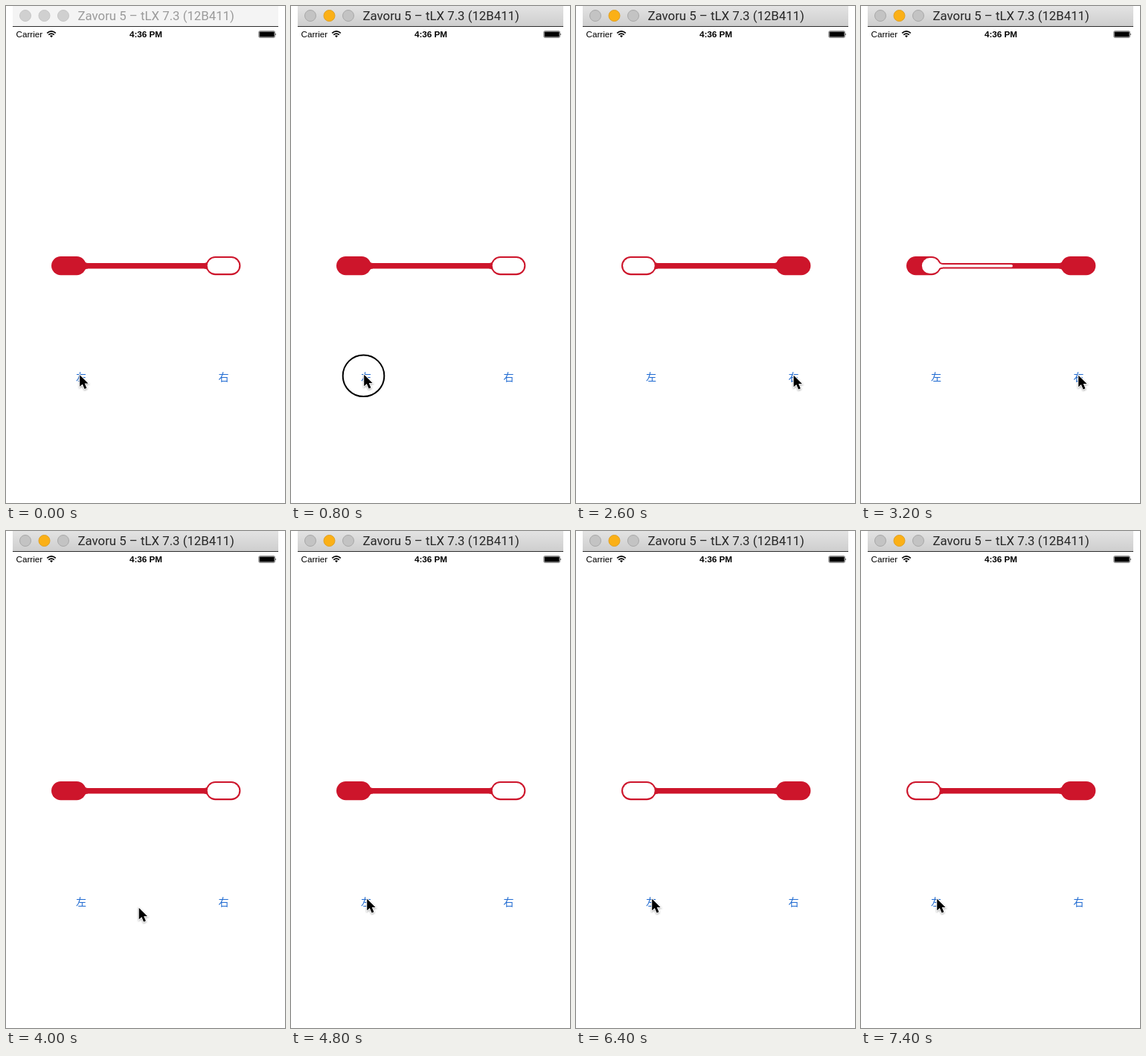
These frames come from a looping animation (375x667 px, 7600 ms). An HTML page:

```html
<!DOCTYPE html>
<html lang="en">
<head>
<meta charset="utf-8">
<title>Switch animation</title>
<style>
  html, body { margin: 0; height: 100%; overflow: hidden; background: #fff; }
  svg { display: block; width: 100vw; height: 100vh; }
  #title { font: 16.8px Roboto, sans-serif; }
  .status { font: 11.7px "Liberation Sans", Arial, sans-serif; }
  .bold { font-weight: bold; text-anchor: middle; }
  .button { font: 14px "Noto Sans CJK SC", "Noto Sans CJK JP", sans-serif; fill: #226cd2; text-anchor: middle; }
  #cursor { filter: drop-shadow(0 1.2px 1px rgba(0, 0, 0, .35)); }
</style>
</head>
<body>
<svg viewBox="0 0 375 667">
  <defs>
    <linearGradient id="chrome" x2="0" y2="1">
      <stop stop-color="#e3e3e3"/><stop offset="1" stop-color="#cecece"/>
    </linearGradient>
    <g id="redEnd">
      <rect x="61" y="336" width="46.6" height="25.2" rx="12.6"/>
      <path d="M103.5 341Q106.5 345 110 345V352.5Q106.5 352.5 103.5 356.5Z"/>
    </g>
  </defs>

  <rect id="bar" x="9" width="357" height="27"/>
  <rect x="9" y="27" width="357" height="1" fill="#2c2c2c"/>
  <g id="dots">
    <circle cx="26" cy="13" r="7.5"/>
    <circle id="amber" cx="51.5" cy="13" r="7.5"/>
    <circle cx="77" cy="13" r="7.5"/>
  </g>
  <text id="title" x="96.5" y="19.3">Zavoru 5 – tLX 7.3 (12B411)</text>

  <text class="status" x="13.5" y="42">Carrier</text>
  <g fill="none" stroke="#000" stroke-width="1.7">
    <path d="M55.2 36.3Q61 31.5 66.8 36.3M57.2 38.7Q61 35.5 64.8 38.7"/>
    <path d="M59 40Q61 38.4 63 40L61 42.2Z" fill="#000" stroke="none"/>
  </g>
  <text class="status bold" x="188" y="42">4:36 PM</text>
  <rect x="339.8" y="33.6" width="21.6" height="8.8" rx="1.6" fill="none" stroke="#000" stroke-width=".5"/>
  <rect x="340.6" y="34.4" width="20" height="7.2" rx=".8"/>
  <path d="M362.3 36.4Q364 38 362.3 39.6Z"/>

  <g fill="#cd152b">
    <use href="#redEnd"/>
    <use href="#redEnd" transform="translate(376.4) scale(-1 1)"/>
    <rect x="105" y="345" width="166" height="7.5"/>
  </g>
  <g id="flow" fill="#fff">
    <rect id="sourcePod"/>
    <path id="neck" d="M100 340.5Q105.5 346.9 110 346.9V350.6Q105.5 350.6 100 357Z"/>
    <rect id="stream" y="346.9" height="3.7" rx="1.85"/>
    <rect id="targetPod"/>
  </g>

  <text class="button" x="101" y="503">左</text>
  <text class="button" x="292.5" y="503">右</text>

  <circle id="ring" r="27.8" fill="none" stroke="#000" stroke-width="2"/>
  <path id="cursor" d="M.7 1.2V16.8L4.3 13.5L7.1 20L9.9 18.8L7.2 12.4H12Z" stroke="#fff" stroke-width="1.8" paint-order="stroke"/>
</svg>
<script>
const LOOP = 7600, STEP = 200, STAGE = 400;
const MIRROR = "translate(376.4) scale(-1 1)";
const POD = { left: 63.1, right: 105.7, top: 338.1, height: 21 };
const STREAM = { from: 107, length: 163 };

// Each move lasts two stages: the first pod drains, then the second fills.
const moves = [
  { start: 1000, left: true },
  { start: 3000, left: false },
  { start: 5150, left: true }
];
const presses = [[600, 1000], [2800, 3000]];
// time, x, y of the pointer tip
const pointerPath = [
  [0, 98.5, 494], [400, 97.5, 493.5], [1200, 97.5, 493.5], [1800, 250.5, 486],
  [2400, 292, 494.5], [3400, 291.5, 494.5], [4000, 178, 504.5],
  [4200, 148, 505], [4600, 101.5, 492.5]
];

const $ = id => document.getElementById(id);
const clamp = v => Math.min(1, Math.max(0, v));
const set = (id, attrs) => {
  for (const name in attrs) $(id).setAttribute(name, attrs[name]);
};

function pointerAt(t) {
  const i = pointerPath.findIndex(p => p[0] > t);
  if (i < 0) return pointerPath.at(-1).slice(1);
  const [a, b] = [pointerPath[i - 1], pointerPath[i]];
  const k = (t - a[0]) / (b[0] - a[0]);
  return [a[1] + (b[1] - a[1]) * k, a[2] + (b[2] - a[2]) * k];
}

function drawPod(id, amount, mirrored) {
  const width = (POD.right - POD.left) * amount;
  const height = Math.min(POD.height, width);
  set(id, {
    x: POD.right - width, y: POD.top + (POD.height - height) / 2,
    width, height, rx: height / 2, transform: mirrored ? MIRROR : ""
  });
}

function drawFlow(t) {
  const move = moves.findLast(m => m.start <= t) || { start: -STAGE * 2, left: false };
  const phase = Math.min(2, (t - move.start) / STAGE);
  const first = clamp(phase), second = clamp(phase - 1);
  const drained = first ** 1.18;
  const head = STREAM.from + STREAM.length * first ** .75;
  const tail = STREAM.from + STREAM.length * second ** .91;
  set("flow", { transform: move.left ? MIRROR : "" });
  drawPod("sourcePod", 1 - drained, false);
  drawPod("targetPod", clamp((second - .2) / .8), true);
  set("stream", { x: tail, width: head - tail });
  set("neck", { visibility: phase > 0 && drained < .65 ? "visible" : "hidden" });
}

function drawWindow(active) {
  set("bar", { fill: active ? "url(#chrome)" : "#f4f4f4" });
  set("dots", { fill: active ? "#c3c3c3" : "#d0d0d0", stroke: active ? "#a9a9a9" : "#c6c6c6" });
  set("amber", active ? { fill: "#fbb016", stroke: "#dfa023" } : { fill: "#d0d0d0", stroke: "#c6c6c6" });
  set("title", { fill: active ? "#262626" : "#9a9a9a" });
}

function draw(now) {
  const t = Math.floor(now % LOOP / STEP) * STEP;
  const [x, y] = pointerAt(t);
  drawWindow(t >= 600);
  drawFlow(t);
  set("cursor", { transform: `translate(${x} ${y})` });
  set("ring", {
    cx: x, cy: y + 2.8,
    visibility: presses.some(([from, to]) => t >= from && t < to) ? "visible" : "hidden"
  });
}

const begin = performance.now();
function tick() {
  draw(performance.now() - begin);
  requestAnimationFrame(tick);
}
tick();
</script>
</body>
</html>
```
